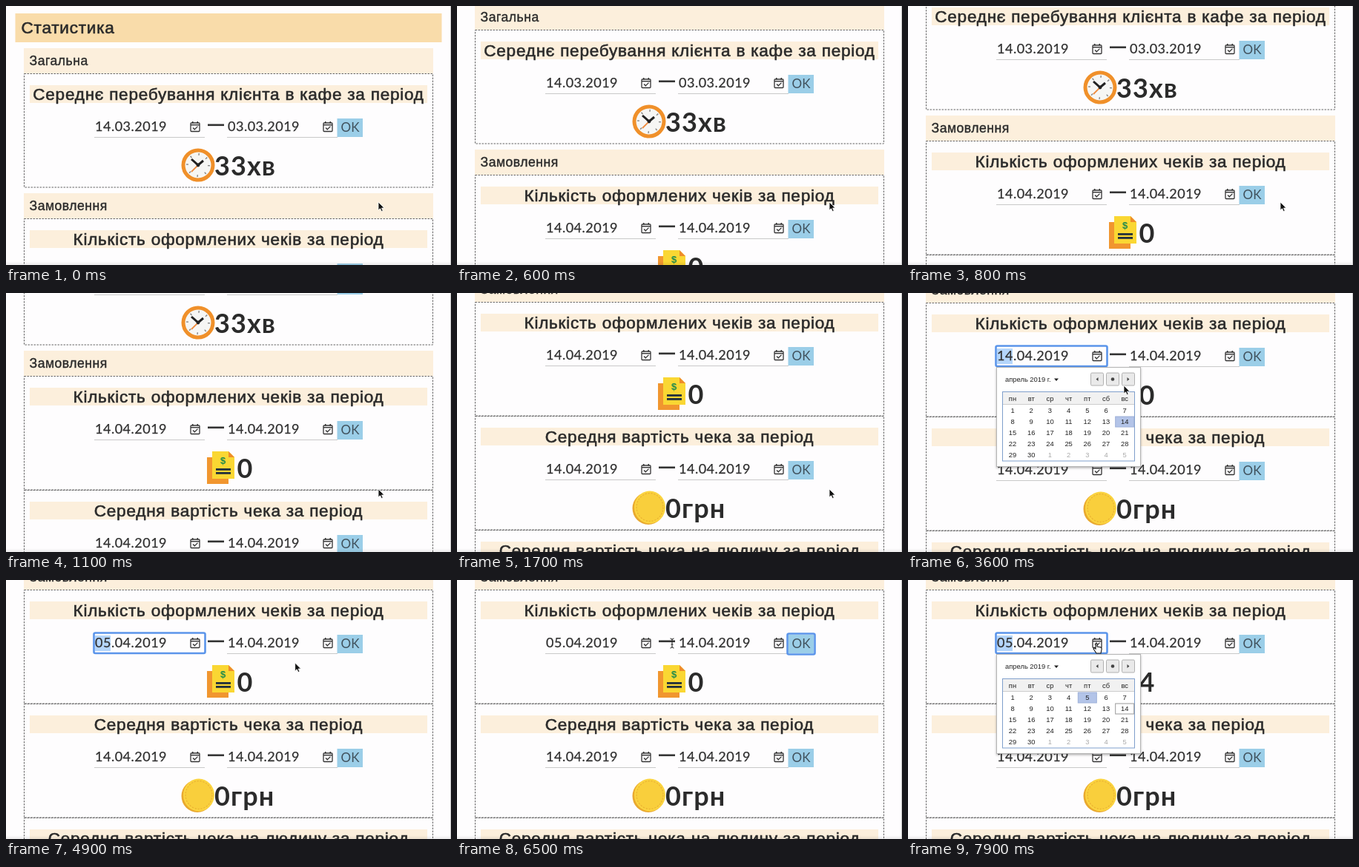
An HTML page for the animation above (8000 ms loop, 600 by 350 pixels).

```html
<!DOCTYPE html>
<html lang="uk">
<head>
<meta charset="utf-8">
<style>
html, body { margin: 0; width: 100%; height: 100%; overflow: hidden; background: #fefdfe }
svg { display: block; width: 600px; height: 350px }
text { fill: #2b2b2b; font-family: "Liberation Sans", Arial, sans-serif; white-space: pre }
.head { font-size: 22.6px; letter-spacing: .74px; stroke: #2b2b2b; stroke-width: .6 }
.sub { font-size: 17.6px; letter-spacing: .5px; stroke: #2b2b2b; stroke-width: .4 }
.date, .ok, .value { font-family: Lato, "Open Sans", sans-serif }
.date { font-size: 18px; letter-spacing: .5px; fill: #303030; stroke: #303030; stroke-width: .25 }
.ok { font-size: 17px; fill: #40515c }
.value { font-size: 36px; font-weight: 700; letter-spacing: 1.1px }
.cal { font-size: 9.4px; fill: #222 }
.mid { text-anchor: middle }
.dash { fill: none; stroke: #666; stroke-width: 1; stroke-dasharray: 2.5 1.5 }
.ring { fill: none; stroke: #5b95ea; stroke-width: 2.6 }
</style>
</head>
<body>
<svg viewBox="0 0 600 350">
  <defs>
    <linearGradient id="edge" x2="0" y2="1">
      <stop offset="0" stop-opacity="0"/><stop offset="1" stop-opacity=".08"/>
    </linearGradient>
    <filter id="soft" x="-10%" y="-10%" width="120%" height="125%">
      <feDropShadow dx="0" dy="1.5" stdDeviation="1.5" flood-opacity=".3"/>
    </filter>
  </defs>
  <rect id="mark" x="120" y="75" width="21" height="21" fill="#b4d5fb"/>
  <g id="page"></g>
  <rect id="fieldRing" class="ring" x="118.5" y="71.5" width="150" height="27.5" rx="2"/>
  <rect id="okRing" class="ring" x="445.5" y="72.5" width="37" height="28" rx="2"/>
  <g id="popup"></g>
  <rect y="345" width="600" height="5" fill="url(#edge)"/>
  <rect x="599" width="1" height="350" fill="#ccc"/>
  <g id="pointer">
    <path id="arrow" d="M0 0V11L2.5 8.7 4.3 12.6 6.2 11.8 4.5 8H8Z" fill="#111" stroke="#fff" stroke-width=".8"/>
    <path id="hand" d="M-2 3V-3Q-1-5 0-3V1L5 2Q6.500 3 6 5L5 10H-1L-5 4Q-4 2-2 4Z" fill="#fff" stroke="#111" stroke-width="1.1"/>
    <path id="beam" d="M-2.500-6Q0-6 0-4Q0-6 2.500-6M0-4V5M-2.500 7Q0 7 0 5Q0 7 2.500 7M-1.500 2H1.500" fill="none" stroke="#222" stroke-width="1"/>
  </g>
</svg>
<script>
const $ = id => document.getElementById(id);
const rect = (x, y, w, h, fill, more = '') =>
  `<rect x="${x}" y="${y}" width="${w}" height="${h}" fill="${fill}" ${more}/>`;
const text = (x, y, cls, s, more = '') => `<text x="${x}" y="${y}" class="${cls}" ${more}>${s}</text>`;
const path = (d, fill, stroke = 'none', w = 1) =>
  `<path d="${d}" fill="${fill}" stroke="${stroke}" stroke-width="${w}"/>`;
const circle = (r, fill, more = '') => `<circle r="${r}" fill="${fill}" ${more}/>`;
const at = (x, y, s) => `<g transform="translate(${x} ${y})">${s}</g>`;

// Icons, drawn around the centre of the value row
const clock = at(259, 96,
  circle(20, '#f6f6f4', 'stroke="#f0902a" stroke-width="5"') +
  circle(14.5, 'none', 'stroke="#888" stroke-width="3" stroke-dasharray="1.4 9.99"') +
  path('M0 0L-9 9', 'none', '#ee8a3c', 1.8) +
  path('M-9-8L0 0L7-6', 'none', '#222', 3) + circle(2.4, '#222'));
const receipt = at(271, 74,
  rect(0, 8, 29, 36, '#f1962f') +
  path('M7 0H29L37 8V37H7Z', '#fad733') + path('M29 0L37 8H29Z', '#ee8c2a') +
  text(21.500, 17, 'mid', '$', 'style="font-size:13px;font-weight:700;fill:#1f8a4c"') +
  rect(12, 23, 20, 2.8, '#22303c') + rect(12, 28, 20, 2.8, '#22303c'));
const coin = at(259, 96,
  '<ellipse cx="-1" cy="1" rx="21.500" ry="22" fill="#e9a92f"/><ellipse cx="1" cy="-.5" rx="21" ry="22" fill="#fbd440"/>' +
  '<ellipse cx="1" cy="-.5" rx="18" ry="19" fill="#f9cf3c" stroke="#edb733" stroke-width="1.4" stroke-dasharray="2.5 1.5"/>');

const dateField = (x, value, id) =>
  text(x + 1, 50, 'date', value, id ? `id="${id}"` : '') +
  rect(x, 58, 149, 1, '#c9c9c9') +
  at(x + 129, 37,
    '<rect x="1" y="2" width="12" height="11.500" rx="1" fill="none" stroke="#333" stroke-width="1.3"/>' +
    rect(1, 4, 12, 1.4, '#333') + rect(3, 0, 1.5, 2.5, '#333') + rect(9.5, 0, 1.5, 2.5, '#333') +
    path('M4 8.500L6.300 10.800L10.500 6.600', 'none', '#333', 1.3));

function block(y, title, icon, valueX, value, from, to, id = '') {
  return at(0, y,
    rect(24.5, -27.5, 551, 153.5, 'none', 'class="dash"') +
    rect(32, -12, 536, 24, '#fcefdc') + text(300, 7.5, 'head mid', title) +
    dateField(119, from, id && id + 'Date') + rect(272, 40.5, 22, 2.6, '#333') + dateField(298, to) +
    rect(446.500, 33, 34.5, 25, '#9bcee8') + text(464, 51, 'ok mid', 'OK') +
    icon + text(valueX, 109.5, 'value', value, id && `id="${id}Value"`));
}
const section = (y, name) => rect(24, y, 552, 34, '#fcefdc') + text(31.5, y + 23, 'sub', name);

const today = '14.04.2019';
$('page').innerHTML =
  rect(12.5, 10, 575, 39, '#f9dcaa') + text(20.5, 37, 'head', 'Статистика') +
  section(57, 'Загальна') +
  block(119, 'Середнє перебування клієнта в кафе за період', clock, 281, '33хв', '14.03.2019', '03.03.2019') +
  section(253, 'Замовлення') +
  block(315, 'Кількість оформлених чеків за період', receipt, 311.5, '0', today, today, 'count') +
  block(469, 'Середня вартість чека за період', coin, 281, '0грн', today, today) +
  block(623, 'Середня вартість чека на людину за період', coin, 281, '0грн', today, today);

// Calendar
const col = i => 141 + i * 25.2, row = i => 159 + i * 15;
const cell = (day, [fill, line]) => {
  const i = day - 1;
  return rect(col(i % 7) - 12.5, row(Math.floor(i / 7)) - 7, 25, 14, fill, `stroke="${line}"`);
};
let cal = rect(119.5, 100.5, 194, 134, '#fff', 'stroke="#b5b5b5" filter="url(#soft)"') +
  text(131, 120, 'cal', 'апрель 2019 г.') + path('M197 115.500H203L200 119Z', '#222') +
  [246.5, 267.5, 288.5].map(x => rect(x, 108, 17, 17, '#eaeaea', 'rx="1.5" stroke="#b0b0b0"')).join('') +
  path('M256.500 114V119L253.500 116.500Z', '#444') + at(276, 116.5, circle(2.3, '#444')) +
  path('M295.500 114V119L298.500 116.500Z', '#444') +
  rect(127.5, 133.5, 178, 93.5, '#fff', 'stroke="#7f9fcc"') +
  rect(128, 134, 177, 16, '#f1f1f1') + rect(128, 150, 177, 1, '#ccc') + '<g id="cells"></g>';
'пн вт ср чт пт сб вс'.split(' ').forEach((d, i) => cal += text(col(i), 146, 'cal mid', d));
for (let i = 0; i < 35; i++)
  cal += text(col(i % 7), row(Math.floor(i / 7)) + 3.4, 'cal mid', i < 30 ? i + 1 : i - 29,
    i < 30 ? '' : 'style="fill:#aaa"');
$('popup').innerHTML = cal;

// Keys: time followed by values
const scrollKeys = [[0, 0], [100, 4], [600, 59], [1100, 175], [1700, 275], [1800, 275], [2100, 274]];
const mouseKeys = [[0, 502, 265], [1800, 502, 265], [2100, 262, 135], [2300, 262, 135], [2600, 255, 89],
  [3300, 255, 89], [3600, 291, 125], [4100, 243, 160], [4500, 243, 160], [5100, 463, 88],
  [5700, 463, 88], [6400, 290, 85], [6700, 290, 85], [7200, 255, 89], [8000, 255, 89]];
function track(keys, t) {
  const i = keys.findIndex(k => k[0] > t);
  if (i < 0) return keys[keys.length - 1].slice(1);
  const a = keys[i - 1], b = keys[i], u = (t - a[0]) / (b[0] - a[0]);
  return a.slice(1).map((v, j) => v + (b[j + 1] - v) * u);
}
const show = (id, on) => $(id).style.display = on ? '' : 'none';
const within = (t, a, b) => t >= a && t < b;

function draw(now) {
  const t = Math.floor(now % 8000 / 100) * 100;
  const [scroll] = track(scrollKeys, t), [x, y] = track(mouseKeys, t);
  $('page').setAttribute('transform', `translate(0 ${-Math.round(scroll)})`);
  $('pointer').setAttribute('transform', `translate(${x} ${y})`);
  const onRow = t > 2100 && y > 72 && y < 100;
  const onButton = onRow && (x > 445 || x > 245 && x < 265);
  show('hand', onButton);
  show('beam', onRow && !onButton);
  show('arrow', !onRow);

  const picked = t >= 4500, focus = within(t, 2800, 5300) || t >= 7400;
  show('fieldRing', focus);
  show('mark', focus);
  show('okRing', within(t, 5300, 7400));
  show('popup', within(t, 2900, 4500) || t >= 7500);
  $('countDate').textContent = picked ? '05.04.2019' : today;
  $('countValue').textContent = t >= 6800 ? '4' : '0';
  const chosen = ['#b3c4e8', '#9db0d8'];
  $('cells').innerHTML = t >= 4000 ? cell(14, ['#fff', '#999']) + cell(5, chosen) : cell(14, chosen);
  requestAnimationFrame(draw);
}
draw(performance.now());
</script>
</body>
</html>
```
